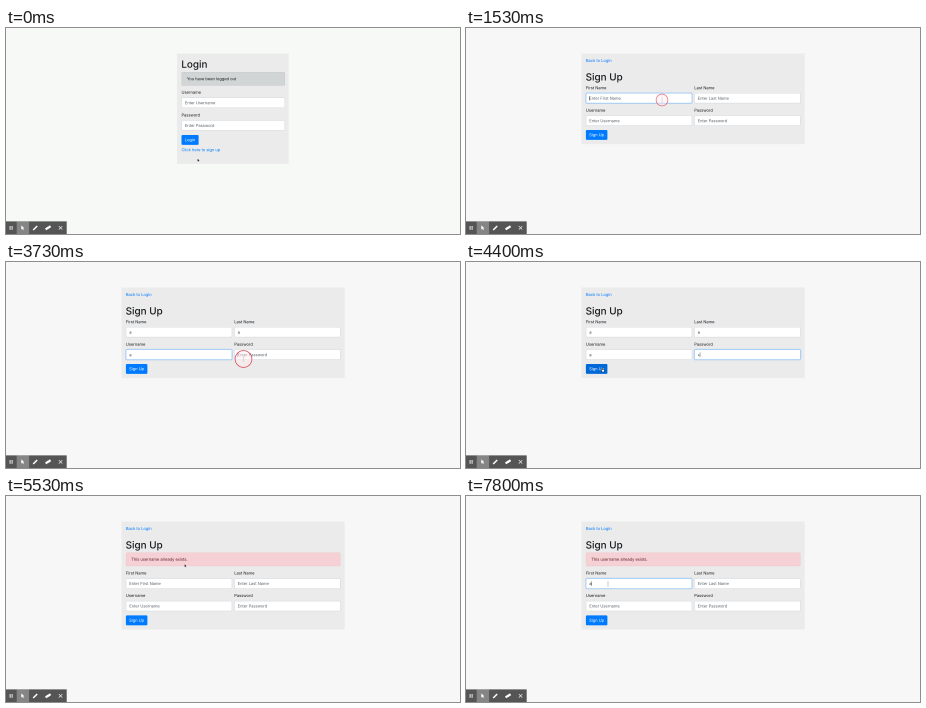
Write an HTML page with a canvas that moves like this. It is 454x206 px and loops after 8 s.

```html
<!DOCTYPE html>
<html lang="en">
<head>
<meta charset="utf-8">
<title>Sign up form</title>
<style>
html, body { margin: 0; width: 100%; height: 100%; overflow: hidden; background: #f7f7f7; }
canvas { display: block; width: 454px; height: 206px; }
</style>
</head>
<body>
<canvas></canvas>
<script>
const WIDTH = 454, HEIGHT = 206, LOOP = 8000;
const BLUE = '#007bff', INK = '#16191c';

// The visitor clicks on a steady beat: link, four fields, button
const BEAT = 800;
const clickTime = i => 530 + BEAT * i;
const SIGNUP_AT = clickTime(0) + 200, ERROR_AT = clickTime(5) + 400;
const RETRY_AT = 6860, RING = 260;
const clicks = [...Array(6).keys()].map(clickTime).concat(RETRY_AT);

// Pointer moves: where it goes and when
const moves = [
  { start: 130, end: 260, x: 194, y: 123 },
  ...[[196, 72], [238, 73], [181.5, 94.7], [237.5, 97], [136, 106.5]].map(([x, y], i) =>
    ({ start: clickTime(i) + 300, end: clickTime(i) + 530, x, y })),
  { start: ERROR_AT + 50, end: 5530, x: 178.5, y: 68 },
  { start: 5860, end: 6530, x: 142, y: 88 }
];

const firstVisit = ['a', 'a', 'a', '•'].map((value, i) =>
  ({ value, start: clickTime(i + 1), typed: clickTime(i + 1) + 270, end: clickTime(i + 2) }));
const secondVisit = [{ value: 'a', start: RETRY_AT, typed: 7400, end: LOOP + BEAT }];

// The scene is drawn oversized and reduced, which keeps small text smooth
const dpr = window.devicePixelRatio || 1;
const OVERSAMPLE = 4;
const canvas = document.querySelector('canvas');
const screen2d = canvas.getContext('2d');
const scene = document.createElement('canvas');
const ctx = scene.getContext('2d');
canvas.width = WIDTH * dpr;
canvas.height = HEIGHT * dpr;
scene.width = canvas.width * OVERSAMPLE;
scene.height = canvas.height * OVERSAMPLE;
screen2d.imageSmoothingQuality = 'high';
ctx.scale(dpr * OVERSAMPLE, dpr * OVERSAMPLE);

const clamp = v => Math.max(0, Math.min(1, v));
const smooth = u => u * u * (3 - 2 * u);

function box(x, y, w, h, r, fill, stroke, lineWidth = 0.4) {
  ctx.beginPath();
  ctx.roundRect(x, y, w, h, r);
  if (fill) { ctx.fillStyle = fill; ctx.fill(); }
  if (stroke) { ctx.strokeStyle = stroke; ctx.lineWidth = lineWidth; ctx.stroke(); }
}

function line(x1, y1, x2, y2, width, color = '#fff') {
  ctx.beginPath();
  ctx.moveTo(x1, y1);
  ctx.lineTo(x2, y2);
  ctx.strokeStyle = color;
  ctx.lineWidth = width;
  ctx.stroke();
}

// Text is set large and scaled down so that glyph advances stay exact
function text(str, x, y, color = INK, size = 4, weight = 400) {
  ctx.save();
  ctx.translate(x, y);
  ctx.scale(0.1, 0.1);
  ctx.font = `${weight} ${size * 10}px Inter, sans-serif`;
  ctx.fillStyle = color;
  ctx.fillText(str, 0, 0);
  const width = ctx.measureText(str).width / 10;
  ctx.restore();
  return width;
}

const heading = (str, x, y) => text(str, x, y, INK, 9.9, 500);

function pointerAt(t) {
  const p = { x: 191.5, y: 130.5, kind: 'arrow' };
  for (const m of moves) {
    const u = smooth(clamp((t - m.start) / (m.end - m.start)));
    p.x += (m.x - p.x) * u;
    p.y += (m.y - p.y) * u;
  }
  return p;
}

// Changes the pointer when it is over the given area
function hover(p, x, y, w, h, kind) {
  const inside = p.x >= x && p.x <= x + w && p.y >= y && p.y <= y + h;
  if (inside) p.kind = kind;
  return inside;
}

function link(label, x, y, w, p) {
  const over = hover(p, x, y - 4, w, 5.5, 'hand');
  const color = over ? '#0056b3' : BLUE;
  const width = text(label, x, y, color);
  if (over) line(x, y + 0.8, x + width, y + 0.8, 0.35, color);
}

function button(label, x, y, w, p) {
  const over = hover(p, x, y, w, 10, 'hand');
  box(x, y, w, 9.9, 1.1, over ? '#0069d9' : BLUE);
  text(label, x + 3.3, y + 6.3, '#fff');
}

function field(label, x, y, w, p, t, { value, start, typed, end } = {}) {
  text(label, x, y - 3.8);
  const glow = value ? clamp((t - start) / 150) * clamp(1 - (t - end) / 150) : 0;
  if (glow) box(x - 0.3, y - 0.3, w + 0.6, 10.8, 1.4, null, `rgba(0,123,255,${0.17 * glow})`, 0.9);
  box(x + 0.2, y + 0.2, w - 0.4, 9.9, 1.1, '#fff', '#ced4da');
  if (glow) box(x + 0.2, y + 0.2, w - 0.4, 9.9, 1.1, null, `rgba(128,189,255,${glow})`);
  const filled = t >= typed;
  const width = text(filled ? value : 'Enter ' + label, x + 3.4, y + 6.7, filled ? '#343a40' : '#5c646b');
  const sinceInput = t - (filled ? typed : start);
  if (t >= start && t < end && sinceInput % 1060 < 530) {
    box(x + 3.3 + (filled ? width : 0), y + 2.9, 0.35, 4.7, 0, '#222');
  }
  hover(p, x, y, w, 10.3, 'beam');
}

function alertBox(message, x, y, w, fill, border, color) {
  box(x + 0.2, y + 0.2, w - 0.4, 13.2, 1.1, fill, border);
  text(message, x + 5.4, y + 8.2, color);
}

function loginPage(t, p) {
  const x = 175.5, w = 103.5;
  box(171, 25.5, 111.7, 110.3, 0, '#ebebeb');
  heading('Login', x - 0.2, 39.8);
  alertBox('You have been logged out', x, 44, w, '#d2d5d5', '#c6c8ca', '#1b1e21');
  field('Username', x, 69.6, w, p, t);
  field('Password', x, 92.2, w, p, t);
  button('Login', x, 107, 17.1, p);
  link('Click here to sign up', x, 123.3, 39, p);
}

function signupPage(t, p) {
  const failed = t >= ERROR_AT;
  const x = 119.9, shift = failed ? 17.4 : 0;
  const fields = failed ? secondVisit : firstVisit;
  box(115.5, 25.5, 223.1, 90.6 + shift, 0, '#ebebeb');
  link('Back to Login', x, 34.1, 25.5, p);
  heading('Sign Up', x - 0.3, 52.6);
  if (failed) alertBox('This username already exists.', x, 56.5, 214.6, '#f5d0d4', '#f2c5ca', '#5a1c24');
  ['First Name', 'Last Name', 'Username', 'Password'].forEach((label, i) => {
    const column = i % 2, row = i >> 1;
    field(label, x + 108.4 * column, 65 + 22.5 * row + shift, 106.2, p, t, fields[i]);
  });
  button('Sign Up', x, 102 + shift, 21.5, p);
}

function arrow(x, y, size, fill, stroke) {
  ctx.save();
  ctx.translate(x, y);
  ctx.scale(size, size);
  ctx.beginPath();
  ctx.moveTo(0, 0);
  ctx.lineTo(0, 3.2);
  ctx.lineTo(0.8, 2.5);
  ctx.lineTo(1.3, 3.6);
  ctx.lineTo(1.8, 3.4);
  ctx.lineTo(1.3, 2.3);
  ctx.lineTo(2.3, 2.3);
  ctx.closePath();
  ctx.fillStyle = fill;
  ctx.fill();
  if (stroke) { ctx.strokeStyle = stroke; ctx.lineWidth = 0.25; ctx.stroke(); }
  ctx.restore();
}

function drawPointer({ x, y, kind }) {
  if (kind === 'beam') {
    line(x, y - 2.2, x, y + 2.2, 0.35, '#666');
    for (const end of [-2.2, 2.2]) line(x - 0.7, y + end, x + 0.7, y + end, 0.3, '#888');
  } else if (kind === 'hand') {
    box(x, y - 0.4, 0.8, 2.4, 0.4, '#fff', '#222');
    box(x - 0.3, y + 1.1, 2.6, 2.3, 0.7, '#fff', '#222');
  } else {
    arrow(x, y, 1, '#111', '#fff');
  }
}

function drawClick(t, { x, y }) {
  const start = clicks.find(c => t >= c && t < c + RING);
  if (start === undefined) return;
  const age = (t - start) / RING;
  ctx.beginPath();
  ctx.arc(x, y, 8.4 - 3.3 * age, 0, 2 * Math.PI);
  ctx.fillStyle = 'rgba(255,235,237,.45)';
  ctx.fill();
  ctx.strokeStyle = `rgba(220,60,80,${0.9 - 0.3 * age})`;
  ctx.lineWidth = 0.8;
  ctx.stroke();
}

function toolbar() {
  box(0, 193.4, 60.7, 12.6, 0, '#555');
  box(10.7, 193.4, 12.4, 12.6, 0, '#858585');
  for (const x of [4.1, 6.1]) line(x, 198, x, 201.8, 0.9);
  arrow(15.3, 197.3, 1.35, '#fff');
  line(27.2, 202, 31.2, 198, 1.5);
  line(39.6, 201.4, 42.6, 199.4, 2.2);
  line(41.6, 200.2, 44.6, 198.2, 2.2);
  line(52.8, 198.1, 56.3, 201.6, 0.6);
  line(56.3, 198.1, 52.8, 201.6, 0.6);
}

function draw(t) {
  const login = t < SIGNUP_AT;
  const pointer = pointerAt(t);
  box(0, 0, WIDTH, HEIGHT, 0, login ? '#f7f9f7' : '#f7f7f7');
  (login ? loginPage : signupPage)(t, pointer);
  toolbar();
  drawPointer(pointer);
  drawClick(t, pointer);
  screen2d.drawImage(scene, 0, 0, canvas.width, canvas.height);
}

const began = performance.now();
function frame() {
  draw((performance.now() - began) % LOOP);
  requestAnimationFrame(frame);
}
frame();
</script>
</body>
</html>
```
